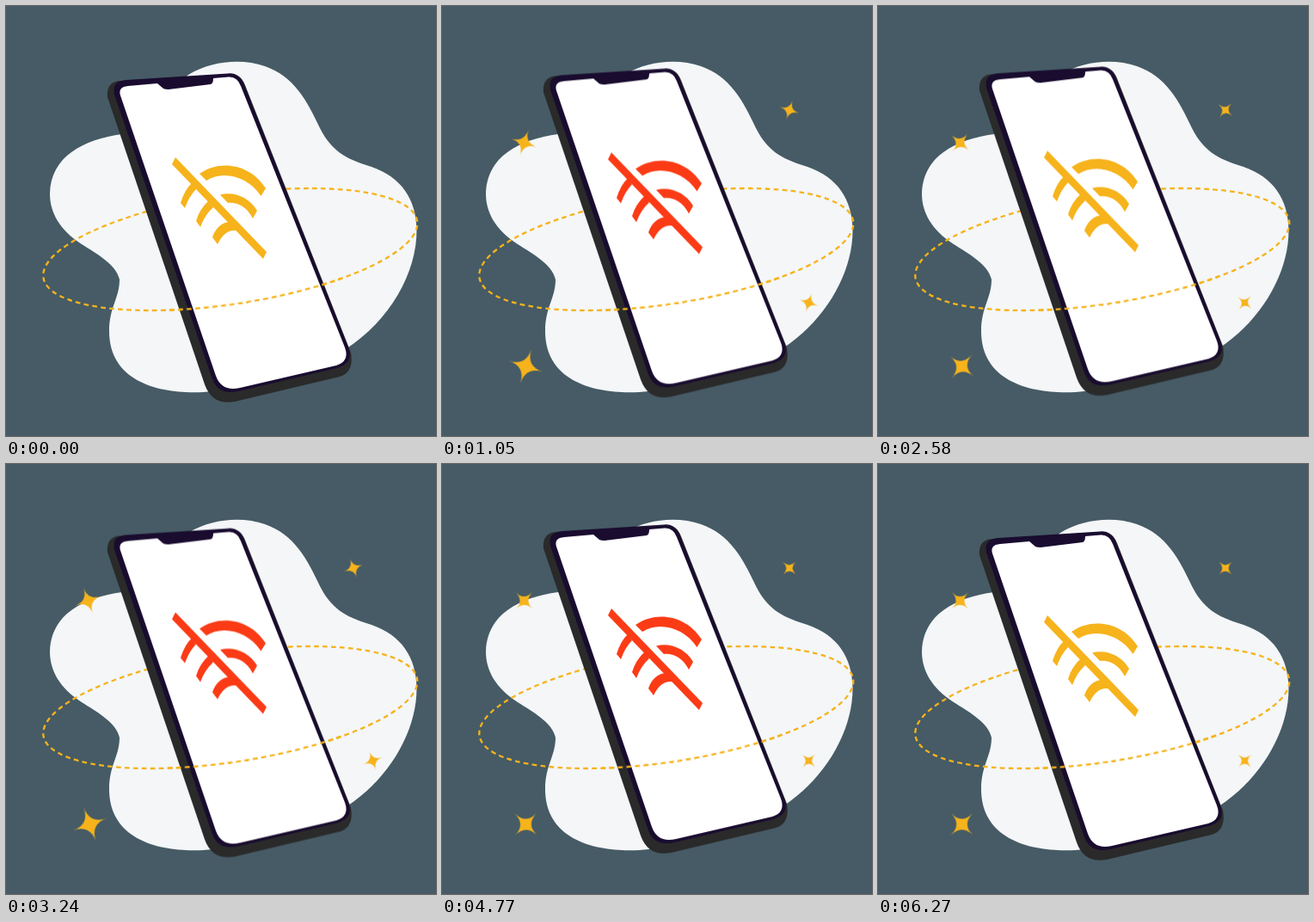
Write an HTML page that moves like this. It is 500 by 500 pixels and loops after 6.33 s.

```html
<!DOCTYPE html>
<html lang="en">
<head>
<meta charset="utf-8">
<title>No connection</title>
<style>
  :root { --loop: 6330ms; --gold: #f6b31b; --red: #fb3b16; }
  html, body { margin: 0; width: 100%; height: 100%; overflow: hidden; background: #465b65; }
  svg { display: block; width: 100%; height: 100%; }

  .orbit {
    fill: none; stroke: var(--gold); stroke-width: 2.3; stroke-dasharray: 5.7 4.3;
    animation: march var(--loop) linear infinite;
  }
  .phone { animation: bob var(--loop) cubic-bezier(.37, 0, .63, 1) infinite; }
  .signal { fill: var(--gold); animation: alert var(--loop) step-end infinite; }
  .star { fill: var(--gold); animation: twinkle var(--loop) ease-in-out infinite; }

  @keyframes march {
    from { stroke-dashoffset: -5; }
    to { stroke-dashoffset: -185; }
  }
  @keyframes bob {
    0%, 26.62%, 58.53%, 90.76%, 100% { transform: translateY(0); }
    10.82%, 42.73%, 74.64% { transform: translateY(-8px); }
  }
  @keyframes alert {
    0%, 26.62%, 58.53%, 90.76% { fill: var(--gold); }
    10.82%, 42.73%, 74.64% { fill: var(--red); }
  }
  @keyframes twinkle {
    0% { transform: rotate(45deg) scale(0); }
    4%, 10.82%, 42.73%, 74.64%, 98.5%, 100% { transform: rotate(45deg) scale(.85); }
    16.59% { transform: rotate(18deg) scale(1); }
    23.7%, 32%, 51.18%, 65.88%, 83.1%, 90% { transform: rotate(-20deg) scale(1); }
  }
</style>
</head>
<body>
<svg viewBox="0 0 500 500">
  <defs>
    <ellipse id="ring" rx="219.8" ry="63.6" pathLength="960" transform="translate(260.8 283) rotate(-8.63)"/>
    <path id="spark" d="M0-21Q0 0 21 0Q0 0 0 21Q0 0-21 0Q0 0 0-21Z"/>
    <clipPath id="front"><rect x="185" y="300" width="210" height="70"/></clipPath>
  </defs>

  <path fill="#f4f6f8" d="M212 80C240 63 275 61 301 70C335 82 350 110 365 142C380 172 400 179 425 187
    C460 199 477 225 477.5 260C478 310 446 366 395 399L240 448C195 453 120 445 120 378
    C120 350 132 340 132 318C128 300 105 288 88 277C62 260 51 240 51 218C52 175 90 155 135 149Z"/>

  <use href="#ring" class="orbit"/>

  <g class="phone">
    <path fill="#2a2a2a" d="M118 106C117 94 122 87 134 87L261 79Q273 79 278 92L401 403Q405 426 388 431
      L266 460Q240 465 231 440Z"/>
    <path fill="#190c2f" d="M126 103C124 92 128 87 140 86L258 78.5Q271 77 277 92L398 397Q405 415 385 421
      L270 448Q247 453 240 434Z"/>
    <path fill="#fff" d="M133 104Q130 94 142 93L176 90L183 96Q185 97 189 97L238 91Q241 90 241 84L259 82.5
      Q269 82 273 93L394 397Q400 413 384 418L272 444Q251 449 244 430Z"/>
    <g class="signal">
      <path d="M197 176L303 286L299 294L193 184Z"/>
      <path d="M225 195C247 179 283 182 302 212L296.500 221C281 197 251 191 233 203Z"/>
      <path d="M249 219.500C264 215 283 222 292 238L287 247C279 232 268 228 258 229Z"/>
      <path d="M216 206Q208 213 203 229L208 235Q213 221 221 213Z"/>
      <path d="M236 226Q225 236 221 250L226 257Q231 243 241 234Z"/>
      <path d="M240 269C245 254 258 247 268 254L273 263C262 258 253 263 246 277Z"/>
    </g>
  </g>

  <g clip-path="url(#front)"><use href="#ring" class="orbit"/></g>

  <g transform="translate(97.5 419)"><use href="#spark" class="star"/></g>
  <g transform="translate(95.5 159) scale(.77)"><use href="#spark" class="star"/></g>
  <g transform="translate(404 121) scale(.57)"><use href="#spark" class="star"/></g>
  <g transform="translate(426.5 345) scale(.57)"><use href="#spark" class="star"/></g>
</svg>
</body>
</html>
```
